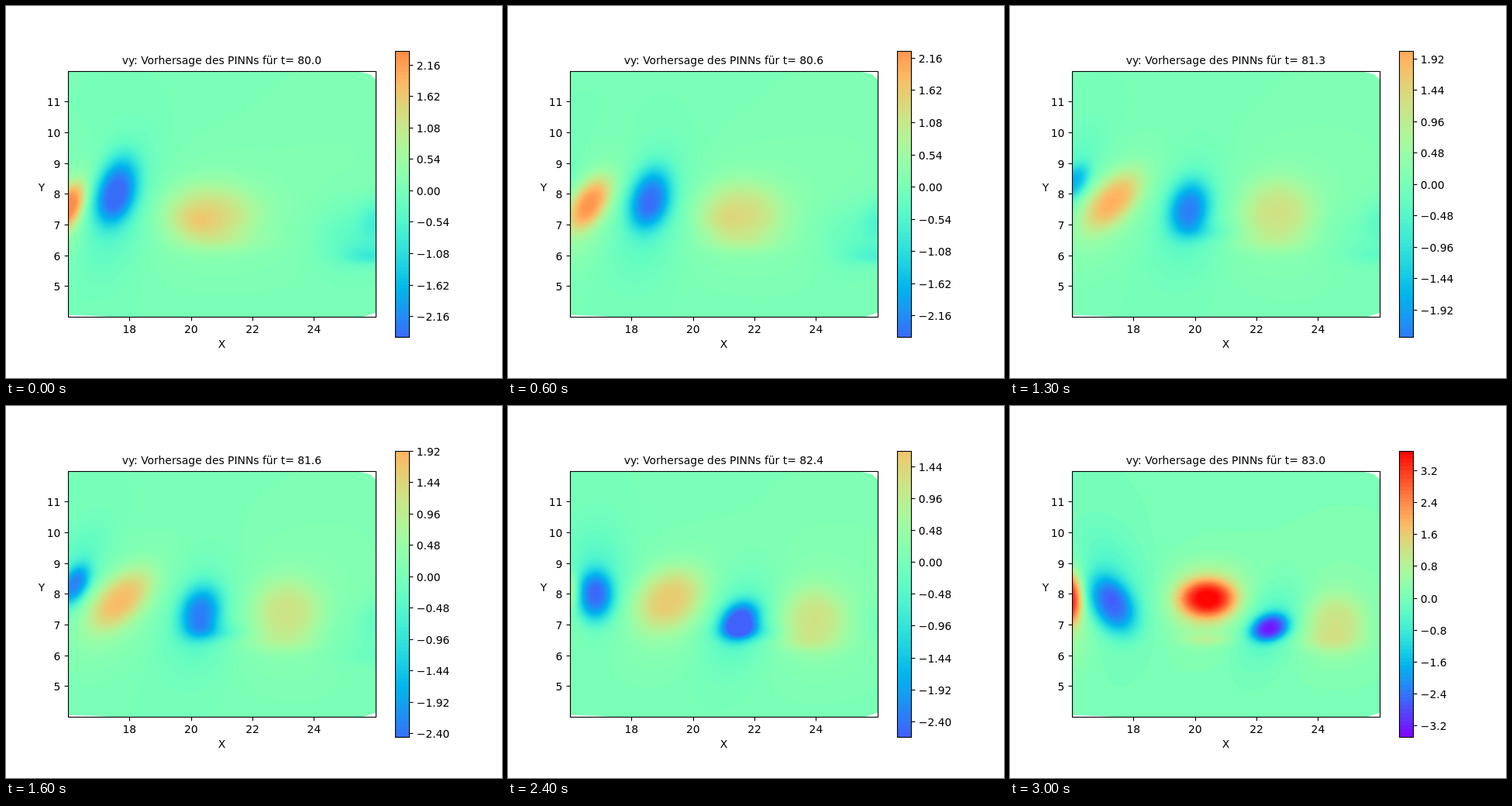
Animation of 640x480 px, one loop 3100 ms. Source, as an HTML page with a canvas:

```html
<!DOCTYPE html>
<html lang="de">
<head>
<meta charset="utf-8">
<title>vy</title>
<style>
  html, body { margin: 0; width: 640px; height: 480px; overflow: hidden; background: #fff; }
  canvas, svg { position: absolute; left: 0; top: 0; display: block; }
  text { font: 13.89px "DejaVu Sans", sans-serif; fill: #000; }
  path, rect { fill: none; stroke: #000; stroke-width: 1.11; }
</style>
</head>
<body>
<canvas id="plot" width="640" height="480"></canvas>
<svg width="640" height="480" viewBox="0 0 640 480">
  <g id="axes"></g>
  <text id="title" x="278.4" y="75" text-anchor="middle"></text>
  <text x="278.4" y="441" text-anchor="middle">X</text>
  <text x="46" y="239" text-anchor="middle">Y</text>
  <g id="scale"></g>
</svg>
<script>
const STEPS = 31, STEP_MS = 100, LAST = STEPS - 1;
const UNIT = 39.68, LEFT = 80, TOP = 84, W = 397, H = 317, MID_Y = 242.4;
const BAR = { x: 502, y: 58, w: 18, h: 369, top: 57.6, size: 369.6 };
const V_MIN = -3.5, V_MAX = 3.7;

const $ = id => document.getElementById(id);
const ctx = $('plot').getContext('2d');
const image = ctx.createImageData(W, H);
const field = new Float32Array(W * H);
const snap = v => Math.floor(v + 0.5) + 0.5;

// A constant, or evenly spaced key values blended linearly; f runs from 0 to 1
function mix(v, f) {
  if (!Array.isArray(v)) return v;
  const p = Math.min(1, Math.max(0, f)) * (v.length - 1);
  const i = Math.min(v.length - 2, Math.floor(p));
  return v[i] + (v[i + 1] - v[i]) * (p - i);
}

// One bump: centre, amplitude, half widths, lean, lower height ratio, flatness of the top
const bumps = [];
const bump = o => bumps.push({ life: [0, LAST], lean: 0, low: 1, flat: 1, ...o });

// A flat-topped bump inside a wide, faint halo that is pulled towards the height `rest`
function wave({ rest = 7.2, ...o }) {
  const each = (v, fn) => [].concat(v, Array.isArray(v) ? [] : v).map(fn);
  bump({ flat: 1.4, ...o });
  bump({
    ...o,
    low: 1,
    y: each(o.y, y => (y + rest) / 2),
    a: each(o.a, a => a * 0.32),
    sx: each(o.sx, s => s * 1.7),
    sy: each(o.sy, s => s + 0.8)
  });
}

// leading trough and its skirt
wave({ x: [17.55, 20.15, 22.43], y: [8, 7.4, 6.87], a: [-2.1, -1.75, -2.7],
       sx: [0.7, 0.7, 0.62], sy: [1.2, 0.95, 0.5], lean: [0.2, 0.1, 0.3], low: 0.85 });
bump({ life: [8, 28], x: [19.6, 22.3], y: 6.75, a: [0, -0.7, -0.7], sx: 0.9, sy: 0.3 });

// crest behind it, flaring up at the end
wave({ x: [16.05, 17.5, 20.38], y: [7.6, 7.8, 7.85], a: [2, 1.4, 1.1],
       sx: [0.45, 0.85, 1.25], sy: [0.8, 1, 1.05], lean: [0.3, 0.6, 0.05] });
bump({ life: [24, 30], x: [19.1, 20.4], y: 7.85, a: [0, 2.3], sx: 0.9, sy: 0.6, flat: 1.5 });
bump({ life: [24, 30], x: [19.4, 20.4], y: 6.5, a: [0, 0.5], sx: 0.8, sy: 0.17 });

// fading crest ahead
wave({ x: [20.6, 23, 24.55], y: [7.3, 7.4, 7], a: [1, 0.85, 0.85],
       sx: [1.5, 1.15, 1], sy: [1, 1.1, 1], low: 0.9 });
bump({ life: [0, 14], x: [20.2, 21.8], y: 7.1, a: [0.35, 0], sx: 0.7, sy: 0.5 });
bump({ x: [21, 24.2], y: 6.45, a: 0.25, sx: 1.3, sy: 0.3 });

// older trough leaving on the right
bump({ x: 26, y: 7.1, a: [-0.6, -0.1], sx: 0.5, sy: 0.7 });
bump({ life: [0, 22], x: 25.9, y: 5.95, a: [-0.65, 0], sx: 0.9, sy: 0.4, low: 0.6 });
bump({ life: [0, 24], x: 25.2, y: 6.6, a: [-0.45, 0], sx: 1.2, sy: 1.1 });

// new trough and crest entering on the left
wave({ life: [5, 30], rest: 9, x: [15.7, 16.3, 17.3], y: [8.6, 8.25, 7.65], a: [-0.2, -2, -2.1],
       sx: [0.35, 0.48, 0.75], sy: [0.4, 0.7, 0.95], lean: [0.4, 0.35, -0.3] });
wave({ life: [21, 30], x: 15.9, y: [8.2, 7.85], a: [0, 2.8], sx: 0.42, sy: [0.5, 0.85] });

// faint background
bump({ x: 25, y: 9, a: 0.12, sx: 4, sy: 4 });

const HIGH = [2.4, 2.25, 2.05, 1.85, 1.65, 3.68];
const LOW = [-2.5, -2.5, -2.3, -2.47, -2.6, -3.5];

// Contour range in whole levels, with the finest step that gives at most 85 of them
function levelsAt(t) {
  const hi = mix(HIGH, t / LAST), lo = mix(LOW, t / LAST);
  const d = [0.06, 0.08, 0.1].find(s => (hi - lo) / s <= 85);
  return { d, hi: Math.ceil(hi / d - 1e-6), lo: Math.floor(lo / d + 1e-6) };
}

function rainbow(v) {
  const x = Math.min(1, Math.max(0, (v - V_MIN) / (V_MAX - V_MIN)));
  return [Math.abs(2 * x - 0.5), Math.sin(Math.PI * x), Math.cos(Math.PI * x / 2)]
    .map(c => Math.round(255 * Math.min(1, Math.max(0, c))));
}

function addBump(o, t) {
  const f = (t - o.life[0]) / (o.life[1] - o.life[0]);
  const [x, y, a, sx, sy, lean] = [o.x, o.y, o.a, o.sx, o.sy, o.lean].map(v => mix(v, f));
  if (f < 0 || f > 1 || !a) return;
  for (let j = 0; j < H; j++) {
    const dy = 8 - (TOP + j + 0.5 - MID_Y) / UNIT - y;
    const v = dy / (dy < 0 ? sy * o.low : sy), vv = v * v;
    if (vv > 9) continue;
    const cx = x + lean * dy;
    for (let i = 0; i < W; i++) {
      const u = (16 + (i + 0.5) / UNIT - cx) / sx, q = u * u + vv;
      if (q < 9) field[j * W + i] += a * Math.exp(-(q ** o.flat));
    }
  }
}

function poly(...pts) {
  ctx.beginPath();
  for (let i = 0; i < pts.length; i += 2) ctx.lineTo(pts[i], pts[i + 1]);
  ctx.fill();
}

function drawField(t, { d, lo, hi }, colors) {
  field.fill(0);
  bumps.forEach(o => addBump(o, t));
  const px = image.data;
  field.forEach((v, i) => {
    const n = Math.min(hi - 1, Math.max(lo, Math.floor(v / d)));
    px.set(colors[n - lo], 4 * i);
    px[4 * i + 3] = 255;
  });
  ctx.putImageData(image, LEFT, TOP);
  ctx.fillStyle = '#fff';
  poly(452, 84, 470, 88, 477, 95, 478, 84);
  poly(458, 402, 478, 395.5, 478, 402);
  poly(80, 398.8, 112, 399.8, 132, 401, 132, 402, 80, 402);
}

function drawBar(colors) {
  const n = colors.length;
  for (let y = BAR.y; y <= BAR.y + BAR.h; y++) {
    const k = Math.floor((1 - (y + 0.5 - BAR.top) / BAR.size) * n);
    ctx.fillStyle = `rgb(${colors[Math.min(n - 1, Math.max(0, k))]})`;
    ctx.fillRect(BAR.x, y, BAR.w, 1);
  }
}

const label = (x, y, s, anchor = 'start') => `<text x="${x}" y="${y}" text-anchor="${anchor}">${s}</text>`;

function barTicks({ d, lo, hi }) {
  const n = hi - lo, every = Math.ceil((n + 1) / 10);
  const tenths = every * d * 10;
  const digits = Math.abs(tenths - Math.round(tenths)) < 1e-6 ? 1 : 2;
  let out = '';
  for (let k = Math.ceil(lo / every) * every; k <= hi; k += every) {
    const y = snap(BAR.top + (hi - k) / n * BAR.size);
    const s = (k < 0 ? '\u2212' : '') + Math.abs(k * d).toFixed(digits);
    out += `<path d="M520.5 ${y}h4.9"/>` + label(529.8, y + 5.5, s);
  }
  return out;
}

function drawAxes() {
  let out = `<rect x="80.5" y="84.5" width="397" height="317"/>
    <rect x="${BAR.x + 0.5}" y="58.5" width="18" height="369"/>`;
  for (let x = 18; x < 26; x += 2) {
    const p = LEFT + (x - 16) * UNIT;
    out += `<path d="M${snap(p)} 401.5v4.9"/>` + label(p, 422, x, 'middle');
  }
  for (let y = 5; y < 12; y++) {
    const p = snap(MID_Y + (8 - y) * UNIT);
    out += `<path d="M80.5 ${p}h-4.9"/>` + label(70.3, p + 5.5, y, 'end');
  }
  $('axes').innerHTML = out;
}

function render(t) {
  const lv = levelsAt(t);
  const colors = Array.from({ length: lv.hi - lv.lo }, (_, i) => rainbow((lv.lo + i + 0.5) * lv.d));
  drawField(t, lv, colors);
  drawBar(colors);
  $('scale').innerHTML = barTicks(lv);
  $('title').textContent = `vy: Vorhersage des PINNs für t= ${(80 + t / 10).toFixed(1)}`;
}

const start = performance.now();
let shown = -1;
function tick() {
  const step = Math.floor((performance.now() - start) / STEP_MS) % STEPS;
  if (step !== shown) render(shown = step);
  requestAnimationFrame(tick);
}
drawAxes();
tick();
</script>
</body>
</html>
```
